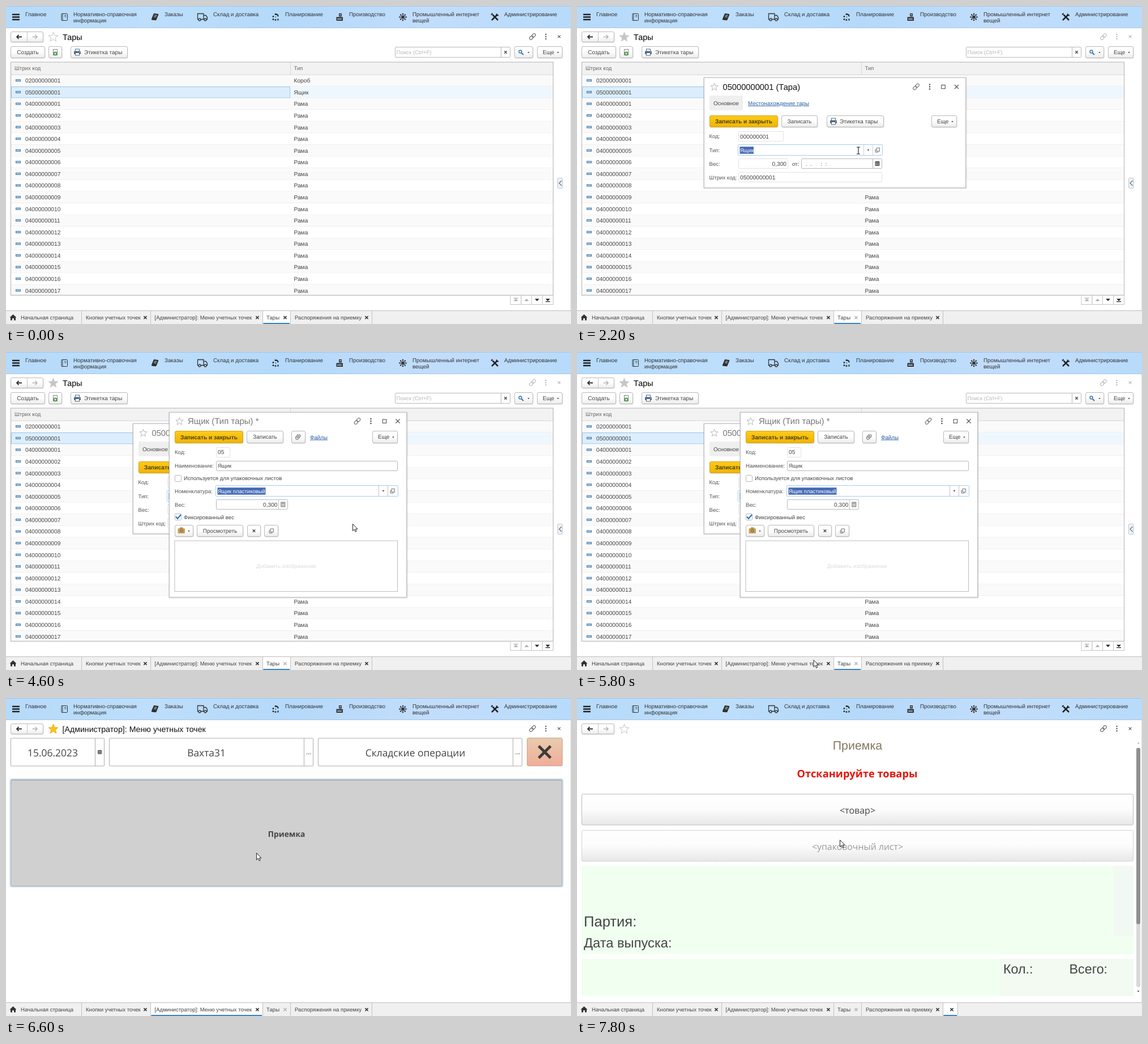
Recreate the animation shown at these times as an HTML page. Size 998 by 561 pixels, loop 8 s.

```html
<!DOCTYPE html>
<html lang="ru">
<head>
<meta charset="utf-8">
<title>Учет тары</title>
<style>
html, body { margin: 0; width: 100%; height: 100%; overflow: hidden; background: #fff; }
svg { display: block; width: 998px; height: 561px; }
text { font-family: "Liberation Sans", Arial, sans-serif; fill: #444; white-space: pre; text-rendering: geometricPrecision; }
.wide { font-family: "Open Sans", "Noto Sans", sans-serif; }
.mid { text-anchor: middle; }
.end { text-anchor: end; }
.bold { font-weight: 700; }
.link { fill: #2a62a8; text-decoration: underline; }
</style>
</head>
<body>
<svg id="stage" viewBox="0 0 998 561" xmlns="http://www.w3.org/2000/svg"></svg>
<script>
const LOOP = 8000, STEP = 200;

// Drawing helpers; boxes are given by their edges
const text = (x, y, s, size = 10, cls = '', fill = '') =>
  `<text x="${x}" y="${y}" font-size="${size}" class="${cls}"${fill && ` style="fill:${fill}"`}>${s}</text>`;
const box = (x1, y1, x2, y2, fill, stroke = 'none', r = 0) =>
  `<rect x="${x1}" y="${y1}" width="${x2 - x1}" height="${y2 - y1}" rx="${r}" fill="${fill}" stroke="${stroke}"/>`;
const path = (d, stroke = '#444', w = 1, fill = 'none') =>
  `<path d="${d}" stroke="${stroke}" stroke-width="${w}" fill="${fill}"/>`;
const solid = (d, fill = '#444') => path(d, 'none', 0, fill);
const dot = (x, y, r, fill = '#333') => `<circle cx="${x}" cy="${y}" r="${r}" fill="${fill}"/>`;
const at = (x, y, s, more = '') => `<g transform="translate(${x} ${y}) ${more}">${s}</g>`;
const layer = (from, to, s) => `<g data-from="${from}" data-to="${to}">${s}</g>`;
const grad = (id, stops, flat) =>
  `<linearGradient id="${id}" x2="${flat ? 1 : 0}" y2="${flat ? 0 : 1}">` +
  stops.map((c, i) => `<stop offset="${i / (stops.length - 1)}" stop-color="${c}"/>`).join('') + '</linearGradient>';

const cross = (x, y, r = 2.6, c = '#444', w = 1.3) =>
  path(`M${x - r} ${y - r}L${x + r} ${y + r}M${x + r} ${y - r}L${x - r} ${y + r}`, c, w);
const caret = (x, y, r = 2) => solid(`M${x - r} ${y - r / 2}h${2 * r}l${-r} ${r * 1.2}z`);
const button = (x1, y1, x2, y2, fill = 'url(#btn)', edge = '#bababa') =>
  box(x1 + .5, y1 + 1.5, x2 + .5, y2 + .7, '#e2e2e2', 'none', 2.5) + box(x1 + .5, y1 + .5, x2 - .5, y2 - .5, fill, edge, 2.5);
const label = (x1, y1, x2, y2, s, size = 9.95) =>
  button(x1, y1, x2, y2) + text((x1 + x2) / 2, (y1 + y2) / 2 + 3.4, s, size, 'mid');
const gold = (x1, y1, x2, y2) => button(x1, y1, x2, y2, 'url(#gold)', '#d0a520') +
  text((x1 + x2) / 2, (y1 + y2) / 2 + 3.5, 'Записать и закрыть', 10.2, 'mid bold', '#4a4010');
const more = (x1, y1, x2, y2) => button(x1, y1, x2, y2) +
  text(x1 + 10, (y1 + y2) / 2 + 3.4, 'Еще') + caret(x2 - 8, (y1 + y2) / 2 + .5, 1.9);
const field = (x1, y1, x2, y2, edge = '#b8b8b8') => box(x1 + .5, y1 + .5, x2 - .5, y2 - .5, '#fff', edge, 1);
const focus = (x1, y1, x2, y2) => field(x1, y1, x2, y2, '#a3cdf0');
const marked = (x, y, w, s) => box(x - .5, y - 9.5, x + w, y + 3, '#446ab6') + text(x, y, s, 9.5, '', '#fff');

function star(x, y, r, fill, edge) {
  let d = '';
  for (let i = 0; i < 10; i++) {
    const a = i * Math.PI / 5, q = i % 2 ? r * .42 : r;
    d += (i ? 'L' : 'M') + (x + q * Math.sin(a)).toFixed(2) + ' ' + (y - q * Math.cos(a)).toFixed(2);
  }
  return path(d + 'z', edge, 1, fill);
}
const chain = (x, y, c) => at(x, y,
  `<rect x="-6.5" y="-2.4" width="7" height="4.8" rx="2.4" fill="none" stroke="${c}"/>` +
  `<rect x="-.5" y="-2.4" width="7" height="4.8" rx="2.4" fill="none" stroke="${c}"/>`, 'rotate(-45)');
const dots = (x, y, c) => [-4, 0, 4].map(d => dot(x, y + d, 1.2, c)).join('');
const printer = (x, y) => at(x, y, box(-3.5, -5.5, 3.5, -1, '#fff', '#567') + box(-6, -2, 6, 3.5, '#4a6c90', 'none', 1) +
  box(-3.5, 1, 3.5, 5.5, '#fff', '#567') + dot(4.3, -.3, .7, '#fff'));
const openIcon = (x, y) => at(x, y, box(-1.5, -3.5, 4, 2, '#fff', '#777') + path('M-1.5 -.5H-3.5V4H1.5V2', '#777'));
const calendar = (x, y, r = 4) => box(x - r, y - r, x + r, y + r, '#555', 'none', 1) +
  path(`M${x - r + 1} ${y - 1}h${2 * r - 2}M${x - r + 1} ${y + 1.6}h${2 * r - 2}`, '#fff', 1).replace('/>', ' stroke-dasharray="1.4 .8"/>');
const calculator = (x, y) => at(x, y, box(-3.5, -4, 3.5, 4, '#eee', '#777') + path('M-2.5 -2H2.5', '#777', 1.4) +
  path('M-2.3 .5H2.5M-2.3 2.5H2.5', '#777').replace('/>', ' stroke-dasharray="1.2 .7"/>'));
const clip = (x, y) => at(x, y,
  path('M-3.5 -1.8H3A1.8 1.8 0 0 1 3 1.8H-3.5A2.9 2.9 0 0 1 -3.5 -3.6H3.5M-3 0H2.5', '#666', 1), 'rotate(-50)');

// Permanent frame: top menu and bottom tabs
const icons = [
  at(17.5, 19.5, path('M-6.5 -4.5H6.5M-6.5 0H6.5M-6.5 4.5H6.5', '#222', 2.4)),
  at(103, 19.5, box(-5, -6, 5.5, 6, 'none', '#333', 1) + path('M-3 -6V6M0 -3H3.5M0 -.5H3.5', '#445', 1)),
  at(263, 19.5, box(-4, -5.5, 4, 5, '#333', '#222', 1) + path('M-2 -3H2.5M-2 -.5H2.5M-4 6.5H4', '#cde', 1), 'skewX(-15) rotate(8)'),
  at(347, 19.5, path('M-8.5 -6H2V4H-8.5zM2 -3H6L8.5 .5V4H2', '#333', 1.3) +
    [-5, 5].map(x => `<circle cx="${x}" cy="4.5" r="2" fill="#bcdcfb" stroke="#333" stroke-width="1.3"/>`).join('')),
  at(476, 19.5, dot(-4, -1, 1.5) + dot(-4, 4, 1.5) + dot(0, -5, 1.5) + dot(0, 5, 1.5) + path('M0 -5Q5 -5 4.5 -1M0 0H1M4.5 3V6', '#222', 2)),
  at(589, 19.5, box(-5.5, 0, 6, 6.5, '#333') + box(-1, -6.5, 4, -1, '#333') + path('M-4 3.5H4M0 -4H3', '#bcdcfb', 1.3)),
  at(701, 19.5, [0, 45, 90, 135].map(a => `<g transform="rotate(${a})">${path('M-5.5 0H5.5', '#333', 1)}${dot(-5.5, 0, 1.3)}${dot(5.5, 0, 1.3)}</g>`).join('') + dot(0, 0, 2.6)),
  at(863.5, 19.5, path('M-5.5 5.5L4.5 -4.5M-4 -4L5.5 5.5', '#222', 2.5) + path('M-6.5 -4L-4 -6.5M3 -6L3.5 -3L6.5 -3', '#222', 2)),
];
const menu = [[34, 'Главное'], [119, 'Нормативно-справочная', 'информация'], [280, 'Заказы'], [366, 'Склад и доставка'],
  [493, 'Планирование'], [606, 'Производство'], [718, 'Промышленный интернет', 'вещей'], [880, 'Администрирование']];
const topBar = box(0, 0, 998, 38, 'url(#bar)') + box(0, 0, 998, 1, '#a5c6e3') + box(0, 38, 998, 39, '#a9c4dc') + icons.join('') +
  menu.map(([x, a, b]) => text(x, 18, a, 9.8, '', '#333') + (b ? text(x, 29, b, 9.8, '', '#333') : '')).join('');

const active = (x1, x2) => box(x1, 538, x2, 559, '#fff') + box(x1 + 1.5, 559, x2 - 1, 561, '#3c86c4');
const tabs = box(0, 537, 998, 561, '#f0f0f0') + box(0, 537, 998, 538, '#bdbdbd') +
  layer(0, 6000, active(453, 502)) + layer(6000, 7200, active(255, 453)) + layer(7200, LOOP, active(646, 672)) +
  [133, 255, 453, 502, 646].map(x => box(x, 538, x + 1, 561, '#c2c2c2')).join('') +
  solid('M6.5 549.5L12.5 544L18.5 549.5H17V554.5H14V551H11V554.5H8V549.5z', '#333') +
  [[26, 'Начальная страница'], [141, 'Кнопки учетных точек'], [262.5, '[Администратор]: Меню учетных точек'], [460, 'Тары'],
    [510, 'Распоряжения на приемку']].map(([x, s]) => text(x, 553.3, s, 9.65)).join('') +
  [246, 444, 637].map(x => cross(x, 549.7, 2.6, '#333', 1.5)).join('') +
  layer(0, 1200, cross(493, 549.7, 2.6, '#333', 1.5)) + layer(1200, LOOP, cross(493, 549.7, 2.6, '#aaa')) +
  layer(7200, LOOP, box(672, 538, 673, 561, '#c2c2c2') + cross(662, 549.7, 2.6, '#333', 1.5));

const tools = c => chain(930, 54, c) + dots(953.5, 54, c) + cross(977, 54, 2.4, c, 1.1);
const nav = button(8, 45, 66, 64) + path('M37.5 46V63', '#c4c4c4') +
  path('M28 54.5H19M22.5 51L19 54.5L22.5 58', '#333', 1.8) + path('M46.5 54.5H55M51.5 51L55 54.5L51.5 58', '#b5b5b5', 1.6);

// List of containers
function listPage() {
  const codes = ['02000000001', '05000000001'];
  for (let i = 1; i <= 17; i++) codes.push('040000000' + String(i).padStart(2, '0'));
  const kinds = ['Короб', 'Ящик'];
  const pitch = 20.58;
  const rows = codes.map((code, i) => {
    const y = 121.5 + i * pitch, end = Math.min(y + pitch, 510);
    return box(9, y, 966, end, i === 1 ? '#eff7fe' : i % 2 ? '#fff' : '#fafafa') + box(9, end - .8, 966, end, '#ececec') +
      (i === 1 ? box(9.5, y + .5, 501.5, end - .8, '#dceefd', '#9ccbf0') : '') +
      box(17.5, y + 8.3, 25.5, y + 11.3, '#a5cbe8', '#487ba6') +
      text(34, y + 13.7, code, 10.2) + text(508.5, y + 13.7, kinds[i] || 'Рама', 10.2);
  }).join('');
  const pager = [900.5, 919.5, 938, 957].map((x, i) => {
    const c = i < 2 ? '#aaa' : '#222', s = i < 2 ? -1 : 1;
    return box(x - 9.5, 510.5, x + 9.5, 526.5, '#fff', '#c4c4c4') +
      solid(`M${x - 4} ${518.5 - 2 * s}h8l-4 ${4 * s}z`, c) +
      (i % 3 ? '' : path(`M${x - 4} ${518.5 + 3 * s}h8`, c, 1.3));
  }).join('');
  return nav + layer(0, 1200, star(83.5, 55, 9, '#fff', '#c4c4c4') + tools('#555')) +
    layer(1200, 6000, star(83.5, 55, 8.8, '#c6c6c6', '#c6c6c6') + tools('#b5b5b5')) +
    text(100, 59.7, 'Тары', 14.4, '', '#000') +
    label(8, 71, 69, 92, 'Создать', 10.1) +
    button(75, 71, 99, 92) + box(83.5, 76.5, 90.5, 86.5, '#fff', '#888') + dot(87, 84, 3.4, '#4a9a4a') + path('M85 84H89M87 82V86', '#fff') +
    button(114, 71, 215, 92) + printer(126, 81.5) + text(138, 84.9, 'Этикетка тары') +
    field(687, 72, 891, 91) + text(689.5, 85, 'Поиск (Ctrl+F)', 9.6, '', '#b8b8b8') + path('M874.5 73V90', '#b8b8b8') + cross(882.5, 81.5, 2.2) +
    button(898, 71, 931, 92) + dot(908.5, 80.5, 3.2, '#2f78b7') + dot(908.5, 80.5, 1.7, '#fff') + path('M910.7 83L914 86', '#2f6ea8', 2) + caret(923, 82, 1.8) +
    more(938, 71, 983, 92) +
    box(9, 99, 966, 121, '#f2f2f2') + text(15, 113.4, 'Штрих код', 9.6, '', '#666') + text(508.5, 113.4, 'Тип', 9.6, '', '#666') +
    rows + path('M9 121.3H966M502.5 99V121', '#d5d5d5') + box(8.5, 99, 966.5, 510.3, 'none', '#b2b2b2') + pager +
    box(974.5, 303.5, 983, 321.5, '#eef2f6', '#c0c8d0', 1) + path('M981.5 308L977 312.5L981.5 317', '#667a90', 1.3);
}

const windowBox = (x1, y1, x2, y2) => box(x1 - 1, y1, x2 + 2, y2 + 2, '#000', 'none', 2).replace('/>', ' opacity=".08"/>') +
  box(x1 + .3, y1 + .3, x2 - .3, y2 - .3, '#fff', '#b2b2b2');
const windowTools = (x, y) => chain(x, y, '#666') + dots(x + 24, y, '#444') +
  box(x + 44.7, y - 3, x + 51.3, y + 3.3, 'none', '#444') + cross(x + 71.5, y, 3.6, '#444', 1.2);

function containerDialog() {
  const title = c => text(257.5, 147.5, '05000000001 (Тара)', 14.7, '', c);
  return windowBox(224, 126, 687, 321) + star(242.5, 143, 7, '#fff', '#b8b8b8') +
    layer(0, 3200, title('#111')) + layer(3200, 6000, title('#777')) + windowTools(599, 142.5) +
    box(234, 158, 293, 184, '#efefef', 'none', 2) + text(241, 174.8, 'Основное', 9.8) + text(302, 174.8, 'Местонахождение тары', 9.75, 'link') +
    gold(234, 193, 355, 214) + label(361, 193, 425, 214, 'Записать') +
    button(441, 193, 542, 214) + printer(453, 203.5) + text(464, 206.9, 'Этикетка тары') + more(626, 193, 671, 214) +
    [['Код:', 233.4], ['Тип:', 257.7], ['Вес:', 282], ['Штрих код:', 306]].map(([s, y]) => text(233.5, y, s, 9.6, '', '#555')).join('') +
    field(285, 221, 365, 239, '#e2e2e2') + text(288, 233.6, '000000001', 10.2) +
    focus(284, 244, 540, 264) + marked(288, 257.7, 24, 'Ящик') + path('M506.5 245V263M522.5 245V263', '#c0d5e8') + caret(514.5, 254) + openIcon(530.5, 254) +
    field(285, 269, 373, 287, '#e2e2e2') + text(370, 282, '0,300', 10.2, 'end') + text(380, 282, 'от:', 9.6) +
    field(396, 269, 539, 287) + text(404, 281.5, '.  .      :  :', 9.6) + path('M522.5 270V286', '#b8b8b8') + calendar(530.5, 278) +
    field(285, 293, 539, 311, '#e2e2e2') + text(288, 306, '05000000001', 10.2);
}

function typeDialog() {
  const name = 'Ящик', item = 'Ящик пластиковый';
  return windowBox(288, 106, 708, 433) + star(306.5, 122.5, 7, '#fff', '#b8b8b8') + windowTools(620.5, 122) +
    layer(0, 4000, text(321, 127.2, 'Ящик (Тип тары)', 15, '', '#111')) +
    layer(4000, 6000, text(321, 127.2, 'Ящик (Тип тары) *', 15, '', '#777')) +
    gold(298, 139, 419, 161) + label(425, 139, 490, 161, 'Записать') + button(504, 139, 529, 161) + clip(516.5, 150) +
    text(537, 153.6, 'Файлы', 9.75, 'link') + more(647, 139, 692, 161) +
    [['Код:', 180], ['Наименование:', 204.3], ['Номенклатура:', 248.7], ['Вес:', 272.8]].map(([s, y]) => text(298, y, s, 9.6, '', '#555')).join('') +
    field(371, 168, 396, 186, '#e2e2e2') + text(374, 180.2, '05', 10.2) +
    layer(0, 4000, focus(370, 190, 694, 211) + marked(374, 204.3, 24, name) + field(371, 236, 692, 254) + text(374, 248.7, item, 9.5)) +
    layer(4000, 6000, field(371, 192, 692, 210) + text(374, 204.3, name, 9.5) + focus(370, 235, 693, 255) + marked(374, 248.7, 84.5, item)) +
    path('M658.5 236V254M674.5 236V254', '#c4c4c4') + caret(666.5, 245) + openIcon(682.5, 245) +
    field(298, 217, 310, 229) + text(314, 226.4, 'Используется для упаковочных листов', 9.65) +
    field(371, 260, 498, 278) + path('M481.5 261V277', '#c4c4c4') + text(479.5, 272.8, '0,300', 10.2, 'end') + calculator(489.3, 269) +
    field(298, 285, 310, 297) + path('M300 290.5L303 294L309 287', '#2a6db0', 2) + text(314, 294.7, 'Фиксированный вес', 9.65) +
    button(298, 305, 331, 326) + box(303.5, 311, 316, 320, '#cfa04a', 'none', 1.5) + box(307, 309.5, 312.5, 312, '#a98a45') +
    dot(310, 315.5, 2.8, '#8a7440') + dot(310, 315.5, 1.5, '#7fa6c8') + caret(323, 316, 1.8) +
    label(337, 305, 419, 326, 'Просмотреть', 9.95) + button(426, 305, 450, 326) + cross(438, 315.5, 2.3) + button(456, 305, 481, 326) + openIcon(468.5, 315.5) +
    box(298, 333, 691.5, 422.5, '#fff', '#bcbcbc') + text(495, 381.3, 'Добавить изображение', 9.8, 'mid', '#dcdcdc');
}

// Accounting point menu
function pointPage() {
  const entry = (x1, split, x2, s) => field(x1, 70.5, x2, 120.5, '#adadad') + path(`M${split + .5} 71V120`, '#adadad') +
    text((x1 + split) / 2, 103, s, 17.4, 'wide mid');
  const ellipsis = x => [-3, 0, 3].map(d => dot(x + d, 98.5, .8, '#555')).join('');
  const main = (fill, edge, y) => box(6.5, 142.5, 984.5, 333.5, '#fff', '#c5dff4', 2) + box(8.5, 144, 982.5, 332, fill, edge, 1.5) +
    text(495.5, y, 'Приемка', 13.8, 'wide mid bold', '#444');
  return nav + star(83.5, 55, 9, '#fcc419', '#e6ac10') + tools('#555') +
    text(99.5, 59.5, '[Администратор]: Меню учетных точек', 14.2, '', '#111') +
    entry(8, 157, 174, '15.06.2023') + calendar(165.5, 95.5, 3.5) +
    entry(182, 526, 543, 'Вахта31') + ellipsis(534.5) + entry(551, 895, 912, 'Складские операции') + ellipsis(904) +
    button(920, 70, 983, 120, 'url(#pink)', '#c9a690') + cross(951.5, 95.3, 10.5, '#3c3c3c', 4.8) +
    layer(0, 6600, main('url(#big)', '#b0b0b0', 244)) +
    layer(6600, 7200, main('#d0d0d0', '#8fa0ae', 245) + path('M9 145H982', '#a8a8a8', 1.2));
}

// Goods receipt
function receiptPage() {
  const bar = (y, s, size, edge, c) => box(8.5, y + .5, 982.5, y + 55, 'url(#bar2)', edge, 2) + text(495.5, y + 34.5, s, size, 'wide mid', c);
  return nav + star(83.5, 55, 9, '#fff', '#c4c4c4') + tools('#555') +
    text(495.5, 91, 'Приемка', 21.4, 'mid', '#857860') +
    text(495, 140.3, 'Отсканируйте товары', 18.3, 'wide mid bold', '#e8150c') +
    bar(169, '&lt;товар&gt;', 16, '#bcbcbc', '#444') + bar(233, '&lt;упаковочный лист&gt;', 15.9, '#d2d2d2', '#999') +
    box(8, 296, 983, 452, '#f0fff0') + box(948, 296, 983, 419, '#f2f9f2') +
    box(8, 460, 983, 526, '#f0fff0') + box(748, 460, 983, 526, '#f2faf2') +
    text(12, 402.5, 'Партия:', 25.6) + text(12, 440, 'Дата выпуска:', 23.7) + text(753, 485.5, 'Кол.:', 23.3) + text(869.5, 485.5, 'Всего:', 23.3) +
    box(988, 88, 995, 510, '#d9d9d9', 'none', 3) + box(988, 88, 995, 399, '#8f8f8f', 'none', 3) +
    solid('M989.5 80.5h4l-2 -2.6z', '#aaa') + solid('M989.5 516.5h4l-2 2.6z', '#444');
}

const arrow = path('M.5 .5V12.5L3.3 9.9L5.2 14.2L7.2 13.3L5.3 9.2H9z', '#222', 1, '#fff');
const beam = path('M-3 -6H-.7L0 -5.3L.7 -6H3M0 -5.3V5.3M-3 6H-.7L0 5.3L.7 6H3', '#222', 1.2);

const stage = document.getElementById('stage');
stage.innerHTML = '<defs>' + grad('bar', ['#b6dafa', '#bddefc', '#b4d9fa', '#c2ddfc', '#b8dbfb'], true) + grad('btn', ['#fff', '#fdfdfd', '#ebebeb']) +
  grad('gold', ['#fdcb1c', '#f0b400']) + grad('pink', ['#e9cbae', '#f0ae98']) + grad('big', ['#e8e8e8', '#e0e0e0', '#cdcdcd']) +
  grad('bar2', ['#fff', '#fcfcfc', '#e7e7e7']) + '</defs>' + box(0, 0, 998, 561, '#fff') + path('M997.5 39V537', '#dcdcdc') +
  layer(0, 6000, listPage()) + layer(1200, 6000, containerDialog()) + layer(3200, 6000, typeDialog()) +
  layer(6000, 7200, pointPage()) + layer(7200, LOOP, receiptPage()) + topBar + tabs +
  `<g id="pointer"><g id="arrow">${arrow}</g><g id="beam">${beam}</g></g>`;

// Pointer stops: time, x, y
const stops = [[600, 960, 440], [800, 700, 270], [1000, 420, 152], [1600, 470, 215], [1800, 505, 330], [2000, 500, 285],
  [2200, 497, 255], [2600, 528, 254], [3200, 528, 254], [3600, 500, 254], [3800, 492, 253], [4000, 492, 253],
  [4400, 580, 290], [4600, 612, 303], [4800, 560, 300], [5000, 560, 300], [5200, 530, 350], [5400, 470, 460],
  [5600, 425, 530], [5800, 417.5, 543], [6200, 417.5, 543], [6400, 442, 273], [7400, 442, 273], [7600, 457, 246], [7800, 464, 250]];

function pointerAt(t) {
  const i = stops.findLastIndex(s => s[0] <= t);
  if (i < 0) return null;
  const [t0, x0, y0] = stops[i], [t1, x1, y1] = stops[i + 1] || [LOOP, x0, y0];
  const k = (t - t0) / (t1 - t0);
  return [x0 + (x1 - x0) * k, y0 + (y1 - y0) * k];
}

const layers = [...stage.querySelectorAll('[data-from]')].map(el => ({ el, from: +el.dataset.from, to: +el.dataset.to }));
const [pointer, arrowShape, beamShape] = ['pointer', 'arrow', 'beam'].map(id => document.getElementById(id));
const show = (el, on) => el.setAttribute('display', on ? 'inline' : 'none');

function draw() {
  const t = Math.floor(performance.now() % LOOP / STEP) * STEP;
  for (const { el, from, to } of layers) show(el, t >= from && t < to);
  const p = pointerAt(t), typing = t >= 2200 && t < 2400;
  show(pointer, p);
  if (p) pointer.setAttribute('transform', `translate(${p[0]} ${p[1]})`);
  show(arrowShape, !typing);
  show(beamShape, typing);
  requestAnimationFrame(draw);
}
draw();
</script>
</body>
</html>
```
